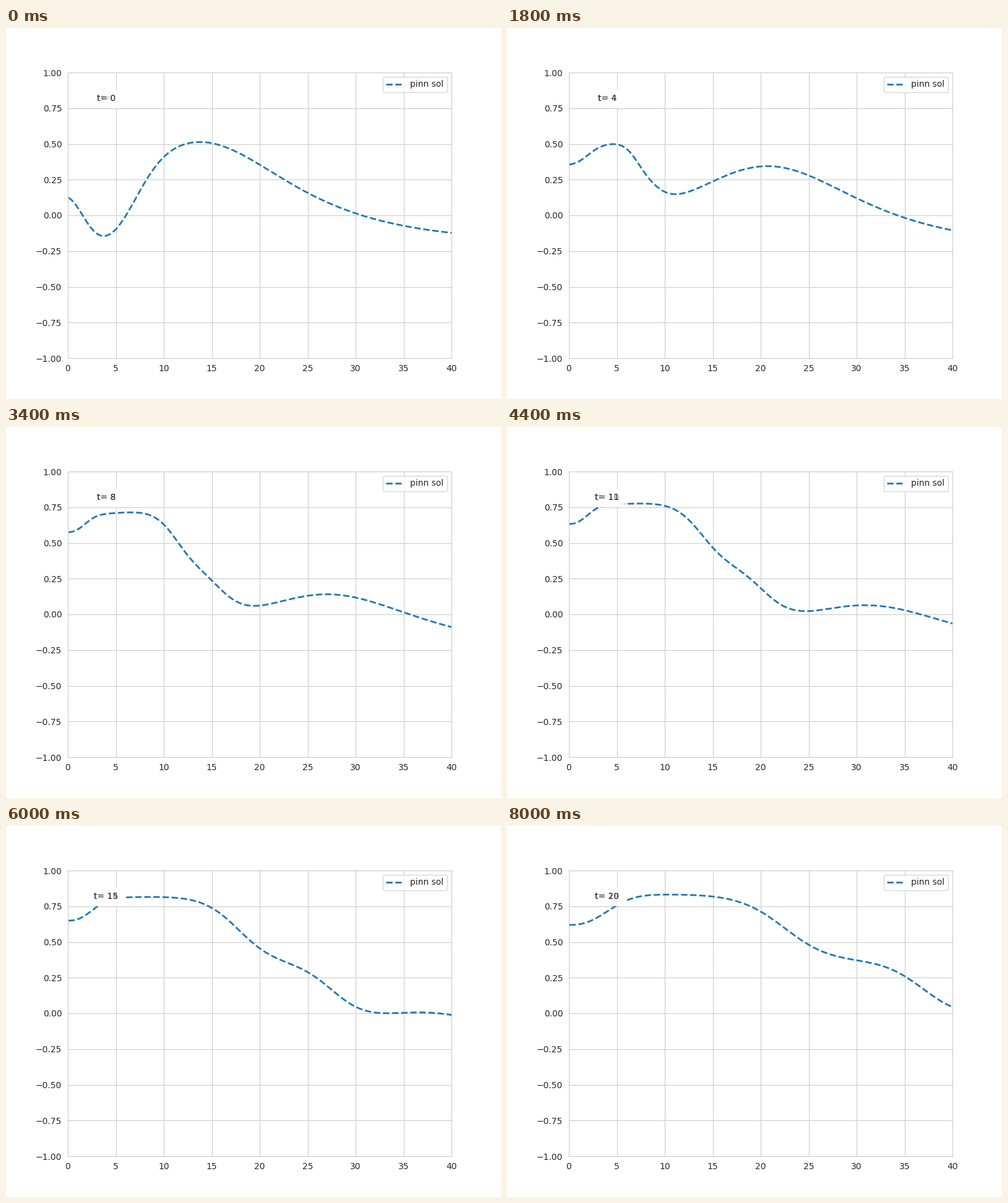
A matplotlib script that plays this animation: 800 px wide and 600 px high, repeating every 8.2 s.

```python
import numpy as np
import matplotlib.pyplot as plt
from matplotlib.animation import FuncAnimation

FRAMES, STEP_MS, DT = 41, 200, 0.5
LAYERS = 8

plt.rcParams.update({
    "font.family": "DejaVu Sans",
    "text.color": ".15",
    "axes.edgecolor": ".8",
    "axes.grid": True,
    "axes.axisbelow": True,
    "grid.color": ".8",
    "xtick.color": ".15",
    "ytick.color": ".15",
    "xtick.bottom": False,
    "ytick.left": False,
})


def step(x, center, width):
    """Smooth drop from 1 to 0 around center."""
    return .5 - .5 * np.tanh((x - center) / (2 * width))


def bell(x, width):
    return np.exp(-(x / width) ** 2)


def swell(x, t):
    """Broad leading crest that runs right and flattens."""
    height = .3 + .4 * bell(t, 7)
    return height / np.cosh((x - 13.6 - 1.58 * t) / 8.5) - .185 - .0078 * t


def fronts(x, t):
    """Two growing steps; the second one runs ahead of the first."""
    slow = .55 * (1 - np.exp(-(t / 6) ** 1.7))
    fast = .4 * (1 - np.exp(-t / 4)) + .011 * t
    return (slow * step(x, 2 + 1.13 * t - .005 * t**2, .25 + .113 * t)
            + fast * step(x, 1.1 + 1.7 * t + .0047 * t**2, .8 + .077 * t))


def shore(x, t):
    """Dent at the left end, widening late."""
    width = 2.2 + .019 * (t - 8) ** 2
    return -(.09 + .0003 * t**2) * np.exp(-(x / width) ** 2.5)


def onset(x, t):
    """Initial bump and trough, soon gone."""
    bump = .24 * bell(x, 2.55)
    trough = .37 * bell(x - 4.35 - 1.7 * t, 3.96)
    return (bump - trough) * bell(t, 2)


def sag(x, t):
    """Brief dip of the far tail."""
    return -.06 * np.sin(np.pi * min(t / 4.5, 1)) * (x / 40) ** 3


def wave(x, t):
    return sum(part(x, t) for part in (swell, fronts, shore, onset, sag))


fig, ax = plt.subplots(figsize=(8, 6), dpi=100)
ax.set_xlim(0, 40)
ax.set_ylim(-1, 1)
x = np.linspace(.05, 40, 400)
line, = ax.plot([], [], "--", color="#1f77b4", lw=2, label="pinn sol")
ax.legend(loc="upper right")

# Labels pile up, each half covering the ones before it.
box = dict(facecolor="w", edgecolor="w", alpha=.5, pad=5)
labels = [ax.text(.1, .9, "t=", transform=ax.transAxes, ha="center",
                  bbox=dict(box)) for _ in range(LAYERS)]


def draw(i):
    line.set_data(x, wave(x, i * DT))
    for j, label in enumerate(labels):
        k = i - LAYERS + 1 + j
        label.set_visible(k >= -2)
        label.set_text("t=" if k < -1 else f"t= {int(max(k, 0) * DT)}")
    return [line, *labels]


anim = FuncAnimation(fig, draw, frames=FRAMES, interval=STEP_MS,
                     repeat=True, repeat_delay=0, blit=False)
plt.show()
```
